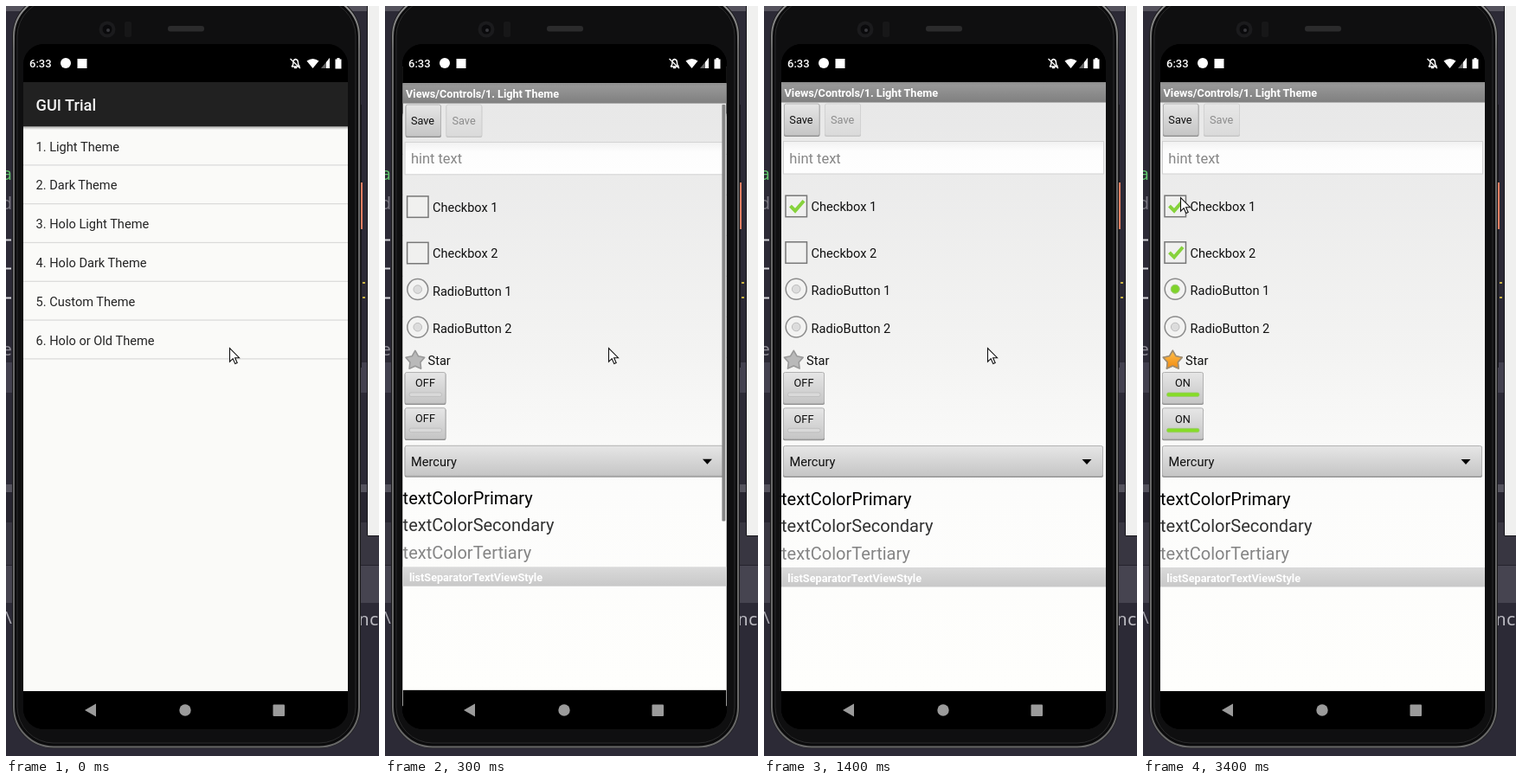
These frames come from a looping animation (431x867 px, 3600 ms). An HTML page:

```html
<!DOCTYPE html>
<html lang="en">
<head>
<meta charset="utf-8">
<title>Theme controls</title>
<style>
  html, body { margin: 0; width: 100%; height: 100%; overflow: hidden; background: #2c2a36; }
  svg { display: block; }
  text { font-family: Roboto, "Open Sans", sans-serif; font-size: 14.6px; white-space: pre; }
  .small { font-size: 12.77px; }
  .big { font-size: 20.06px; }
  .bold { font-weight: 700; font-size: 12.7px; }
  .code { font-family: "Noto Sans Mono", "DejaVu Sans Mono", monospace; font-size: 20px; }
</style>
</head>
<body>
<svg id="stage" width="431" height="867" viewBox="0 0 431 867">
  <defs>
    <linearGradient id="page" gradientUnits="userSpaceOnUse" x1="0" y1="112" x2="0" y2="792">
      <stop offset="0" stop-color="#e8e8e8"/><stop offset=".42" stop-color="#f3f3f2"/>
      <stop offset=".65" stop-color="#fcfcfb"/><stop offset="1" stop-color="#fefefc"/>
    </linearGradient>
    <linearGradient id="title" x2="0" y2="1"><stop stop-color="#8c8c8c"/><stop offset=".15" stop-color="#979797"/><stop offset="1" stop-color="#7f7f7f"/></linearGradient>
    <linearGradient id="key" x2="0" y2="1"><stop stop-color="#e6e6e6"/><stop offset="1" stop-color="#c5c5c5"/></linearGradient>
    <linearGradient id="field" x2="0" y2="1"><stop stop-color="#f1f1f1"/><stop offset=".3" stop-color="#fdfdfd"/><stop offset="1" stop-color="#fefefe"/></linearGradient>
    <linearGradient id="sep" x2="0" y2="1"><stop stop-color="#dadada"/><stop offset="1" stop-color="#c8c8c8"/></linearGradient>
    <linearGradient id="shade" x2="0" y2="1"><stop stop-opacity=".35"/><stop offset="1" stop-opacity="0"/></linearGradient>
    <linearGradient id="gold" x2="0" y2="1"><stop stop-color="#ffc04a"/><stop offset="1" stop-color="#f08a12"/></linearGradient>
    <linearGradient id="rim" gradientUnits="userSpaceOnUse" x1="0" y1="0" x2="0" y2="867">
      <stop offset="0" stop-color="#929292"/><stop offset=".06" stop-color="#686868"/>
      <stop offset="1" stop-color="#686868"/>
    </linearGradient>
    <clipPath id="screen"><rect x="20" y="44" width="375" height="792" rx="24"/></clipPath>
  </defs>

  <g id="desk">
    <rect width="431" height="867" fill="#2c2a36"/>
    <rect width="431" height="6" fill="#54525c"/>
    <rect y="412" width="431" height="35" fill="#43414f"/>
    <rect y="553" width="431" height="9" fill="#55535e"/>
    <rect y="562" width="431" height="35" fill="#272530"/>
    <rect y="597" width="431" height="49" fill="#383641"/>
    <rect y="646" width="431" height="44" fill="#464450"/>
    <path d="M0 646.5H431" stroke="#25232d"/>
    <path d="M0 270.5H6M0 303.5H6M0 337.5H6" stroke="#d6d6da" stroke-width="2"/>
    <text class="code" x="-5" y="201" fill="#62c46e">a</text>
    <text class="code" x="-5" y="235" fill="#77757f">d</text>
    <text class="code" x="-5" y="404" fill="#8b8992">e</text>
    <text class="code" x="-3" y="714" fill="#a9a8b0">\</text>
    <text class="code" x="407.500" y="716" fill="#bab9c0">nc</text>
    <path d="M410.5 114V418" stroke="#17161c"/>
    <rect x="408" y="204" width="4" height="54" fill="#e57f62"/>
    <path d="M412 320h3M412 337h3" stroke="#c9b243" stroke-width="2"/>
    <path d="M417.5 -2V612.5H433V-2Z" fill="#f0f0ef" stroke="#17171b"/>
  </g>

  <g id="phone">
    <rect x="7" y="-13" width="403" height="871" rx="48" fill="#1a1a1b"/>
    <rect x="9" y="-11" width="399" height="867.500" rx="46" fill="#0b0b0c" stroke="url(#rim)" stroke-width="2"/>
    <rect x="13" y="-7" width="391" height="859" rx="42" fill="#0f0f10" stroke="#2b2b2c"/>
    <circle cx="117" cy="27" r="9.500" fill="#1b1b1d"/>
    <circle cx="117" cy="27" r="5.500" fill="#0a0a0c"/>
    <circle cx="118" cy="28" r="2" fill="#39393e"/>
    <rect x="137" y="18" width="8" height="18" rx="2" fill="#171718"/>
    <rect x="187" y="23" width="42" height="6.500" rx="3" fill="#2b2b2c"/>
    <rect x="20" y="44" width="375" height="792" rx="24" fill="#000"/>
  </g>

  <g clip-path="url(#screen)">
    <g id="menu"></g>
    <g id="form"></g>
  </g>

  <g id="bars" fill="#fff">
    <text x="27" y="71" style="font-weight:500;font-size:13px">6:33</text>
    <circle cx="69" cy="66" r="6"/>
    <rect x="82.500" y="61" width="11" height="11"/>
    <path d="M330 70q2-1 2-5 0-3 2.500-3.500 3 .5 3 4 0 3.500 2 4.500zM333 71.500h3" stroke="#fff" fill="none" stroke-width="1.400"/>
    <path d="M328.500 61L340 72" stroke="#fff" stroke-width="1.300"/>
    <path d="M347.500 63.500Q354.500 58.500 361.500 63.500L354.500 72Z"/>
    <path d="M374 60V72H364Z" opacity=".4"/><path d="M374 60V72H370V65Z"/>
    <path d="M380.500 61.500H382.500V60H385.500V61.500H387.500V72.500H380.500Z"/>
    <g fill="#9b9b9b">
      <path d="M91 814L104 806.500V821.500Z"/>
      <circle cx="207" cy="814" r="6.700"/>
      <rect x="308.500" y="807.500" width="13.500" height="13.500" rx="1"/>
    </g>
  </g>

  <path id="cursor" d="M.5 .5V16.200L4.200 12.700L6.800 18.600L9.200 17.500L6.600 11.700H11.500Z" fill="#fff" stroke="#111" stroke-width="1.100"/>
</svg>

<script>
const $ = id => document.getElementById(id);
const LOOP = 3600, STEP = 100, OPEN_AT = 48;
const MID = [207.5, 440];

const rect = (x, y, w, h, fill, more = '') =>
  `<rect x="${x}" y="${y}" width="${w}" height="${h}" fill="${fill}" ${more}/>`;
const label = (x, y, str, fill = '#111', cls = '', more = '') =>
  `<text x="${x}" y="${y}" fill="${fill}" class="${cls}" ${more}>${str}</text>`;

function menuMarkup() {
  const rows = ['Light', 'Dark', 'Holo Light', 'Holo Dark', 'Custom', 'Holo or Old'];
  return rect(20, 44, 375, 792, '#000') + rect(20, 88, 375, 704, '#fafaf8') +
    rect(20, 139, 375, 4, 'url(#shade)') + rect(20, 88, 375, 51.2, '#212121') +
    label(34.5, 121, 'GUI Trial', '#f2f2f2', '', 'style="font-weight:500;font-size:18.24px"') +
    rows.map((name, i) => {
      const y = 44.8 * i;
      return label(34.5, 167.5 + y, `${i + 1}. ${name} Theme`, '#232323') +
        rect(20, 183.3 + y, 375, 1.2, '#dadad9');
    }).join('');
}

const button = (x, y, w, h) =>
  rect(x, y + 1, w, h, '#8d8d8d', 'rx="2"') +
  rect(x + .5, y + .5, w - 1, h - 1, 'url(#key)', 'rx="2" stroke="#b2b2b2"');

const checkbox = (id, y, name) =>
  rect(25, y, 24.5, 24.5, '#f0f0ef', `id="${id}Box" stroke="#777" stroke-width="1.5"`) +
  `<path id="${id}" d="M30.500 ${y + 12}L36 ${y + 17.500}L46 ${y + 6}" fill="none" stroke="#86d23c" stroke-width="4"/>` +
  label(54.5, y + 18, name);

const radio = (id, y, name) =>
  `<circle cx="37.200" cy="${y}" r="12" fill="#f3f3f2" stroke="#8b8b8b" stroke-width="1.500"/>
   <circle cx="37.200" cy="${y}" r="4.800" fill="#dcdcdc" stroke="#bdbdbd"/>
   <circle id="${id}" cx="37.200" cy="${y}" r="5" fill="#7ed32a" stroke="#a5cf7e"/>` +
  label(54.5, y + 7, name);

function starPath(cx, cy, r) {
  const pts = Array.from({ length: 10 }, (_, i) => {
    const a = i * Math.PI / 5, d = i % 2 ? r * .55 : r;
    return [cx + d * Math.sin(a), cy - d * Math.cos(a)].map(v => v.toFixed(1)).join(' ');
  });
  return `M${pts.join('L')}Z`;
}

const star = (fill, line, more) =>
  `<path d="${starPath(34.3, 409.8, 11.5)}" fill="${fill}" stroke="${line}" stroke-width="1.600" stroke-linejoin="round" ${more}/>`;

const toggle = (id, y) =>
  button(22, y, 48, 37) +
  label(46, y + 17.2, 'OFF', '#111', 'small', `id="${id}Text" text-anchor="middle"`) +
  rect(27.5, y + 24, 37.5, 4.5, '#d9d9d9', `id="${id}Bar" rx="2" stroke="#bcbcbc" stroke-width=".8"`);

function formMarkup() {
  return rect(20, 44, 375, 792, '#000') + rect(20, 88, 375, 704, 'url(#page)') +
    rect(20, 88, 375, 23.5, 'url(#title)') +
    label(23.5, 104.8, 'Views/Controls/1. Light Theme', '#fff', 'bold') +
    button(23, 112.5, 41.5, 37.5) + label(29.3, 136, 'Save', '#111', 'small') +
    `<g opacity=".4">${button(70, 112.5, 42, 37.5)}</g>` + label(77, 136, 'Save', '#8c8c8c', 'small') +
    rect(22.5, 156.5, 370, 37.5, 'url(#field)', 'stroke="#d2d2d2"') +
    label(29.3, 181.5, 'hint text', '#868686', '', 'style="font-size:16.5px"') +
    checkbox('check1', 219.2, 'Checkbox 1') + checkbox('check2', 272.8, 'Checkbox 2') +
    radio('radio1', 327.2, 'RadioButton 1') + radio('radio2', 371, 'RadioButton 2') +
    star('#b9b9b9', '#999', '') + star('url(#gold)', '#a08d70', 'id="star"') +
    label(49, 414.6, 'Star') +
    toggle('toggle1', 423) + toggle('toggle2', 464.3) +
    button(22, 508, 370, 36) + label(29.5, 532, 'Mercury') +
    '<path d="M367.500 524H378.500L373 530Z"/>' +
    label(20, 576.7, 'textColorPrimary', '#000', 'big') +
    label(20, 608, 'textColorSecondary', '#323232', 'big') +
    label(20, 639.6, 'textColorTertiary', '#858585', 'big') +
    rect(20, 649, 375, 22.5, 'url(#sep)') +
    label(27.3, 665.5, 'listSeparatorTextViewStyle', '#fff', 'bold') +
    rect(390, 113, 4, 483, '#858585', 'id="scroll" rx="1"');
}

$('menu').innerHTML = menuMarkup();
$('form').innerHTML = formMarkup();

// Two-part easing: quick start, very slow finish.
const CURVES = [
  [[0, 0], [.05, 0], [.1333, .06], [.1667, .4]],
  [[.1667, .4], [.2083, .82], [.25, 1], [1, 1]]
];
function ease(x) {
  if (x <= 0) return 0;
  if (x >= 1) return 1;
  const curve = CURVES[x < .1667 ? 0 : 1];
  const at = (u, k) => {
    const [a, b, c, d] = curve.map(p => p[k]), v = 1 - u;
    return a * v * v * v + 3 * b * u * v * v + 3 * c * u * u * v + d * u * u * u;
  };
  let lo = 0, hi = 1;
  for (let i = 0; i < 24; i++) {
    const m = (lo + hi) / 2;
    if (at(m, 0) < x) lo = m; else hi = m;
  }
  return at(lo, 1);
}

const clamp = v => Math.max(0, Math.min(1, v));
const show = (id, on) => $(id).setAttribute('opacity', +on);
const zoom = (id, s) => $(id).setAttribute('transform',
  `translate(${MID}) scale(${s}) translate(${-MID[0]} ${-MID[1]})`);

// Time, x, y of the pointer.
const POINTER = [
  [0, 258, 395], [2800, 47, 410], [2900, 27, 380], [3000, 25, 335],
  [3100, 30, 284], [3200, 46, 242], [3300, 60, 221], [3400, 43, 221]
];

function setToggle(id, on) {
  $(id + 'Text').textContent = on ? 'ON' : 'OFF';
  $(id + 'Bar').setAttribute('fill', on ? '#86dc28' : '#d9d9d9');
  $(id + 'Bar').setAttribute('stroke', on ? '#9cc873' : '#bcbcbc');
}

function draw(t) {
  const open = t - OPEN_AT, p = ease(open / 400);
  zoom('menu', 1 + .05 * p);
  zoom('form', .85 + .15 * p);
  show('form', clamp((open - 50) / 50));
  show('scroll', clamp((1400 - t) / 300));

  show('check1', t >= 1100);
  show('check2', t >= 1600);
  const paint = (id, hot) => $(id).setAttribute('fill', hot ? '#f3a630' : '#f0f0ef');
  paint('check1Box', t === 1100);
  paint('check2Box', t === 1600);
  show('radio1', t >= 1700);
  show('radio2', false);
  show('star', t >= 1700);
  setToggle('toggle1', t >= 1800);
  setToggle('toggle2', t >= 1800);

  const [, x, y] = POINTER.filter(k => k[0] <= t).pop();
  $('cursor').setAttribute('transform', `translate(${x} ${y})`);
}

const start = performance.now();
function tick() {
  const t = Math.max(0, performance.now() - start) % LOOP;
  draw(Math.floor(t / STEP) * STEP);
  requestAnimationFrame(tick);
}
tick();
</script>
</body>
</html>
```
